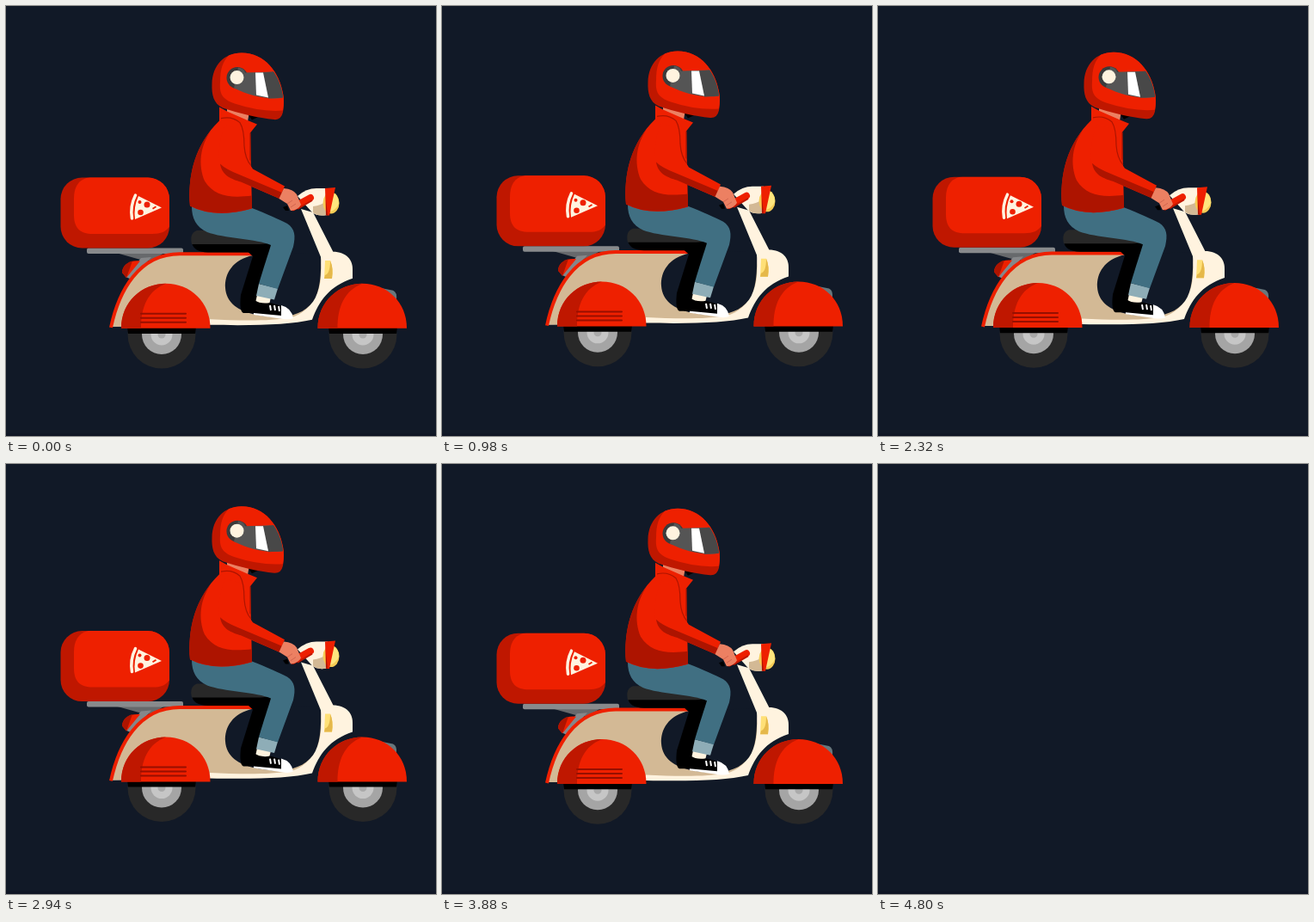
Write an HTML page that moves like this. It is 500 px wide and 500 px high and loops after 4.82 s.

```html
<!DOCTYPE html>
<html lang="en">
<head>
<meta charset="utf-8">
<title>Delivery scooter</title>
<style>
  html, body { margin: 0; width: 100%; height: 100%; overflow: hidden; background: #111927; }
  svg { display: block; width: 100vw; height: 100vh; }
  .bg { fill: #111927; }
  .red { fill: #ee2000; }
  .deep { fill: #bf1700; }
  .dark { fill: #ad1400; }
  .cream { fill: #fff3df; }
  .tan { fill: #d3b995; }
  .coal { fill: #282828; }
  .skin { fill: #ec8062; }
  .jeans { fill: #406f82; }
  .line { fill: none; stroke: #ad1400; stroke-width: 1.2; }
</style>
</head>
<body>
<svg viewBox="0 0 500 500">
  <defs>
    <g id="wheel">
      <circle class="coal" r="39.5"/>
      <circle r="23" fill="#a5a5a5"/>
      <circle r="12.5" fill="#c6c6c6"/>
      <circle r="4.5" fill="#aaa"/>
      <path d="M-40-9H40L39-1H-39Z"/>
    </g>
    <g id="fender">
      <path class="red" d="M-52 0C-52-31-28-52-0-52S51.500-31 51.500 0Z"/>
      <path class="deep" d="M-52 0C-52-31-28-52 0-52C-21-44-29-25-29 0Z"/>
    </g>
    <clipPath id="boxShape"><rect x="63.500" y="199.500" width="126.500" height="82" rx="25"/></clipPath>
  </defs>
  <rect class="bg" width="500" height="500"/>
  <rect y="497" width="500" height="3" fill="#0f1524"/>

  <g id="rider">
    <!-- rack and tail light -->
    <path d="M128 287H184L170 296H160Z" fill="#67696c"/>
    <path d="M157 293L169 292L146 318L139 315Z" fill="#85878a"/>
    <path class="red" d="M156 296.500C143 295 135 302 135 310L140 316Z"/>
    <path class="dark" d="M147 296.500C138 299 135 305 135 310L140 316Z"/>
    <rect x="94" y="281.500" width="112" height="6.500" rx="2" fill="#888a8c"/>

    <!-- delivery box -->
    <g clip-path="url(#boxShape)">
      <rect class="deep" x="63" y="199" width="127" height="83"/>
      <path class="red" d="M98 199C84 201 79 211 79 224V243C79 258 86 265 101 265H170C181 265 187 262 191 255V199Z"/>
    </g>
    <path d="M150.500 220Q144 233 146.500 247" fill="none" stroke="#fff3df" stroke-width="3.500" stroke-linecap="round"/>
    <path class="cream" d="M154 221L181 234.500L150 248Q148 234 154 221Z"/>
    <g class="red">
      <circle cx="164" cy="231" r="3.500"/>
      <circle cx="156.500" cy="240" r="3.300"/>
      <circle cx="155.500" cy="228" r="2"/>
      <path d="M170 235L174 232.500L175 234L171 236.500Z"/>
    </g>

    <!-- scooter body -->
    <use href="#wheel" x="181" y="382"/>
    <use href="#wheel" x="415" y="382"/>
    <g transform="translate(0 -1.2)">
      <path class="cream" d="M122 374C130 335 152 290 200 290H366L380 287C396 287 404 297 403 309V318C376 327 364 344 356 366C330 372 290 373 237 372Z"/>
      <path class="tan" d="M124 374C131 336 154 291 202 291H288L366 300C369 332 357 355 332 363.500C306 368 270 367 237 365.500V374Z"/>
      <path class="bg" d="M288 291C263 296 254 313 255 329C256 346 270 356 290 360C318 366 344 363 357 345C365 334 367 314 366 288Z"/>
      <path d="M122 375C131 333 154 289.500 202 289.500H288" fill="none" stroke="#ee2000" stroke-width="4"/>
      <use href="#fender" x="186" y="376"/>
      <path d="M157 359H209M157 364H209M157 369H209" stroke="#970f00" stroke-width="2" stroke-linecap="round"/>
      <path d="M430 328L450 332Q455 334 454 343H444Z" fill="#68777c"/>
      <use href="#fender" x="414.500" y="376"/>
    </g>

    <!-- steering column and lamp -->
    <path class="cream" d="M343 236L357 240L381 287L372 308L366.500 293Z"/>
    <path d="M371 296H377Q381 305 379 317H370Z" fill="#ffe077"/>
    <path d="M371 313Q377 311 377 296Q381 305 379 317H370Z" fill="#e5b84a"/>
    <path class="cream" d="M339 221Q349 212 361 212H374L373 243Q362 245 356 240Z"/>
    <path class="tan" d="M357 233Q366 232 373 227V243Q362 245 357 240Z"/>
    <ellipse cx="378" cy="229" rx="9.500" ry="12.500" fill="#f5cc55"/>
    <path d="M379 217Q387 219 387 230Q382 239 376 239Z" fill="#ffe67e"/>
    <path class="red" d="M371 212L383 211L376 243.500H372Z"/>
    <path class="dark" d="M372 225L374 243H372Z"/>

    <!-- far leg and seat -->
    <path d="M266 272L309 271L308 288L296 337L291 357H276Q271 355 273 336L287 291Z"/>
    <path d="M216 274H308L306 286.500H235Q217 286 216 274Z"/>
    <path class="coal" d="M222 261H290L308 274Q304 277 295 277H216Q213 264 222 261Z"/>

    <!-- near leg and shoe -->
    <path class="cream" d="M292 336L308 339L306 347L290 345Z"/>
    <path d="M289 342Q296 347 307 345L321 349L324 361L288 358Z"/>
    <path d="M320 348Q332 351 334 363Q330 365 322 364L288 359V357L320 360Z" fill="#fff"/>
    <path d="M307 348L308 354M312 348L313 354M317 349L318 355" stroke="#fff" stroke-width="2"/>
    <path fill="#8eadb7" d="M294 323L316 328.500L312 341.500L291 337Z"/>
    <path class="jeans" d="M216 233L286 235C304 242 317 248 327 253C336 259 337 267 334 280L316 329L294 323C300 303 305 288 308 278C293 271 252 270 234 263C221 257 216 247 216 233Z"/>

    <!-- neck and jacket -->
    <g transform="translate(0 .6)">
      <path d="M278 121L294 128L286 132Z"/>
      <path class="skin" d="M257 115L283 122L281 134L257 125Z"/>
      <path class="red" d="M248 117L257 122L281 132.500L292 137L284 147L286 235Q243 247 214 232C211 197 220 160 248 133Z"/>
      <path class="dark" d="M238 145C226 162 223 184 231 203C242 221 261 223 286 220V235Q243 247 214 232C211 197 220 166 238 145Z"/>
      <path class="red" d="M255 138C247 155 246 176 249 187C251 197 263 201 273 204L318 223.500L324 209L287 189Q281 182 280 166L277 144Z"/>
      <path class="dark" d="M249 183C251 197 263 201 273 204L318 223.500L321 216.500L270 195Q255 189 249 183Z"/>
      <path class="line" d="M250 130Q263 127 272 135Q277 143 277 162Q278 177 285 185M284 147V179"/>
    </g>

    <!-- hand and grip -->
    <path d="M322 234L327 232L329 238H325Z"/>
    <path d="M334 234L354 223" stroke="#ee2000" stroke-width="8" stroke-linecap="round"/>
    <path d="M339 236L356 226" stroke="#bf1700" stroke-width="2"/>
    <path class="skin" d="M323 212Q334 213 338 219L343 231Q340 237 331 238L327 230L317.500 224Z"/>
    <path d="M327 230L333 226M331 234L337 230" stroke="#d2654f" stroke-width="1"/>

    <!-- helmet -->
    <g transform="translate(0 .6)">
      <path class="deep" d="M239.500 90C240 68 254 54 274 54C301 54 318 77 322 101Q324 110 322 123Q320 132 312 131.500C294 130 270 124 252 118C241 113 239 102 239.500 90Z"/>
      <path class="red" d="M259 57C264 55 268 54 274 54C301 54 318 77 322 101Q324 110 322 121Q296 123 266 113C251 108 248 101 249 88C249 73 252 64 259 57Z"/>
      <circle cx="269" cy="83" r="12.500" fill="#3b3b3b"/>
      <path d="M270 71Q277 72 278 77L311 76C317 84 321 96 322 106C305 109 284 104 265 95Z" fill="#555"/>
      <path d="M299 77L311 76C317 84 321 96 322 106L305 107Z" fill="#484848"/>
      <path d="M290 77H299L305 106L291 103Z" fill="#fff"/>
      <circle class="cream" cx="268.500" cy="82.500" r="8"/>
    </g>
  </g>
</svg>
<script>
  const LOOP = 4820, RIDE = 4800, HALF = 600, LIFT = 6, STEP = 20;
  const rider = document.getElementById('rider');

  function draw() {
    const t = Math.floor((performance.now() % LOOP) / STEP) * STEP;
    const phase = t % (2 * HALF) / HALF;
    const y = -LIFT * (1 - Math.abs(1 - phase));
    rider.setAttribute('transform', `translate(0 ${y.toFixed(2)})`);
    rider.setAttribute('visibility', t < RIDE ? 'visible' : 'hidden');
    requestAnimationFrame(draw);
  }
  draw();
</script>
</body>
</html>
```
